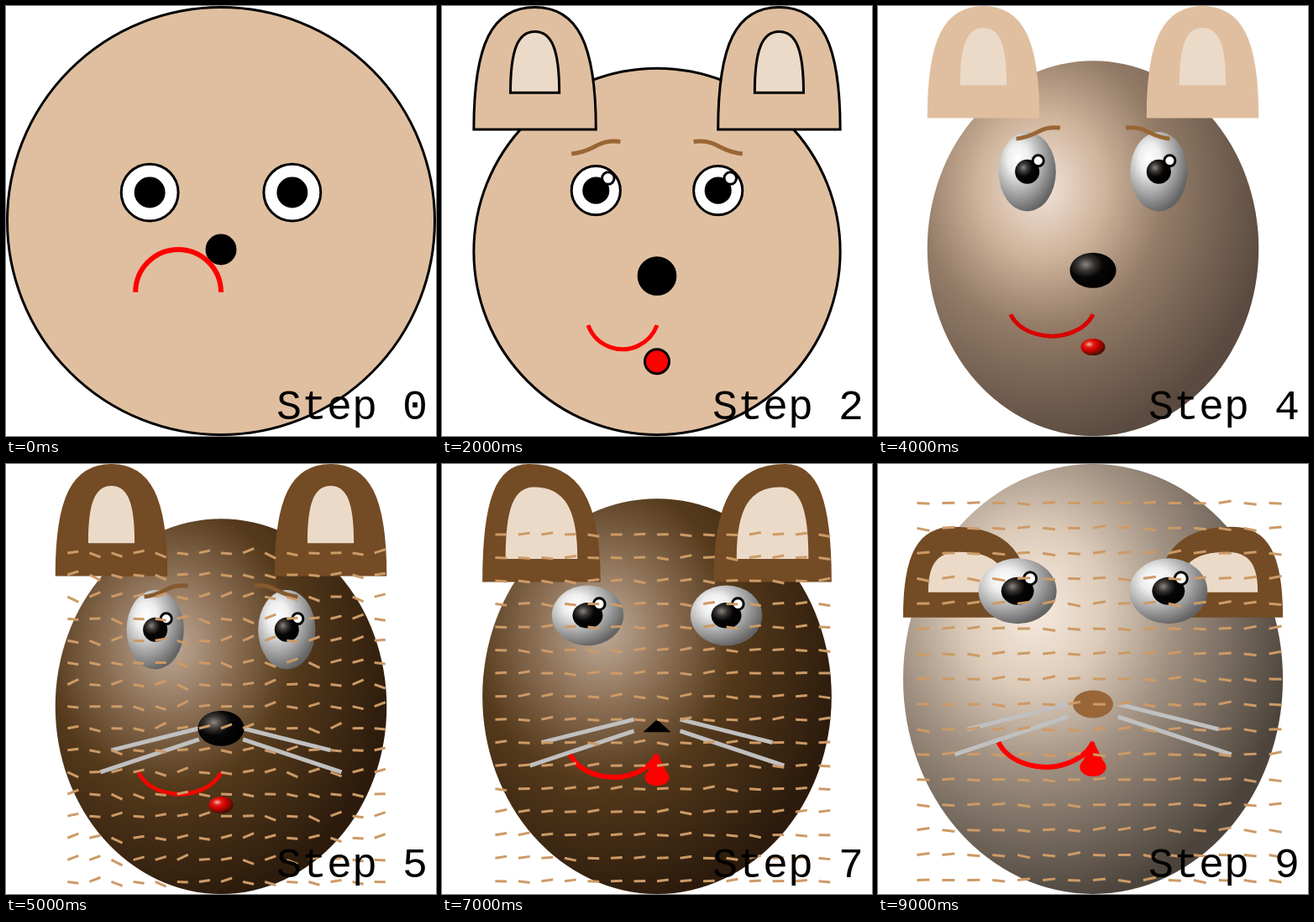
Recreate the animation shown at these times as an HTML page with a canvas. Size 512 by 512 pixels, loop 10 s.

```html
<!DOCTYPE html>
<html>
<head>
<meta charset="utf-8">
<style>
html, body { margin: 0; height: 100%; overflow: hidden; background: #fff; }
canvas { display: block; }
</style>
</head>
<body>
<canvas id="stage" width="512" height="512"></canvas>
<script>
const ctx = document.getElementById('stage').getContext('2d');
const STEP_MS = 1000;
const SKIN = '#e0bfa0', BROWN = '#734b24', INNER_EAR = '#ecdac8', FUR = '#cd9a66';

// Stops of the radial shading, from the lit spot outwards.
const STOPS = [0, 0.25, 0.5, 0.92];
const TAN = ['#f2e4da', '#d0b49c', '#937b67', '#5a4a3f'];
const DARK = ['#c0ab98', '#8c7056', '#553a1c', '#2c1b0c'];
const PALE = ['#f8ece0', '#dccbb9', '#9f8f80', '#4c443c'];
const BALL = ['#ffffff', '#eeeeee', '#b8b8b8', '#646464'];
const PUPIL = ['#8a8580', '#383431', '#060606', '#000000'];
const TONGUE = ['#f5b8a4', '#e01c14', '#cc0000', '#401000'];

// Lengths are in face units; the head is 1.5 units in half-width.
const plain = {
  total: 3.5, headRy: 1.5, skin: SKIN, earFill: SKIN, outline: 'black',
  eye: [0.5, -0.5, 0.2, 0.2], pupil: [0.1, 0.1], nose: [0.15, 0.15],
  mouth: [0.3, 0.3, 0.5], mouthWidth: 5, mouthColor: 'red',
  ear: [-1, 1], earLean: 0, tongue: [0.1, 0.1]
};
const detailed = {
  ...plain, closedEars: true, innerEar: [-1.3, 0.5, 0.2],
  glint: true, brow: -0.8, browColor: '#996633'
};
const oval = {
  ...detailed, total: 3.9, headRy: 1.7, eye: [0.6, -0.7, 0.25, 0.35],
  nose: [0.2, 0.15], mouth: [0.4, 0.3, 0.5], mouthColor: '#e00000',
  ear: [-1.2, 1], innerEar: [-1.5, 0.5, 0.2], brow: -1, tongue: [0.1, 0.065]
};
const shaded = { ...oval, outline: null, skin: TAN, mouthColor: '#d80000' };
const furry = {
  ...shaded, skin: DARK, earFill: BROWN, browColor: '#85592e',
  whiskers: true, fur: 0.05, mouthColor: '#ee0800'
};
const mouse = {
  ...furry, total: 3.7, eye: [0.6, -0.7, 0.3, 0.25], pupil: [0.12, 0.1],
  ear: [-1, 1], innerEar: [-1.2, 0.6, 0.3], earLean: 0.22, brow: null, fur: 0.022,
  mouth: [0.4, 0.3, 0.4], mouthWidth: 6, mouthColor: 'red', tongue: null, drop: true, nose: 'triangle'
};
const lowEars = {
  ...mouse, total: 3.4, skin: PALE, ear: [-0.5, 0.7], innerEar: [-0.7, 0.3, 0.3]
};
const steps = [
  { ...plain, total: 3, eye: [0.5, -0.2, 0.2, 0.2], nose: [0.1, 0.1],
    mouth: [0.3, 0.3, 0.5], frown: true, mouthWidth: 6, ear: null, tongue: null },
  plain,
  detailed,
  oval,
  shaded,
  furry,
  { ...mouse, total: 3.5, ear: [-1, 0.8], innerEar: [-1.2, 0.4, 0.3], nose: [0.2, 0.15] },
  mouse,
  lowEars,
  { ...lowEars, nose: [0.16, 0.11], noseColor: '#99663a' }
];

function randomFrom(seed) {
  return () => {
    seed = (seed * 16807) % 2147483647;
    return seed / 2147483647;
  };
}

function drawFace(face, index) {
  const u = 509 / face.total;
  const cy = 510.5 - face.headRy * u;
  const X = x => 256 + x * u;
  const Y = y => cy + y * u;

  function paint(fill, line) {
    if (fill) { ctx.fillStyle = fill; ctx.fill(); }
    if (line) { ctx.strokeStyle = line; ctx.lineWidth = 3; ctx.stroke(); }
  }

  function ellipse(x, y, rx, ry, fill, line) {
    ctx.beginPath();
    ctx.ellipse(X(x), Y(y), rx * u, ry * u, 0, 0, 7);
    paint(fill, line);
  }

  // A flat outlined ellipse, or a ball lit from the upper left.
  function ball(x, y, rx, ry, flat, colors) {
    if (face.outline) return ellipse(x, y, rx, ry, flat, face.outline);
    ctx.save();
    ctx.translate(X(x), Y(y));
    ctx.scale(rx * u + 1.5, ry * u + 1.5);
    const light = ctx.createRadialGradient(-0.31, -0.33, 0, -0.31, -0.33, 1.5);
    STOPS.forEach((stop, i) => light.addColorStop(stop, colors[i]));
    ctx.beginPath();
    ctx.arc(0, 0, 1, 0, 7);
    ctx.fillStyle = light;
    ctx.fill();
    ctx.restore();
  }

  function line(x1, y1, x2, y2) {
    ctx.moveTo(X(x1), Y(y1));
    ctx.lineTo(X(x2), Y(y2));
  }

  // An arch of two full-shouldered curves; earLean moves its peak outwards.
  function ear(side, base, height, half, fill, closed) {
    const left = side - half, right = side + half;
    const peak = side + side * half * face.earLean;
    const top = Y(base - height), shoulder = Y(base - height * 0.7);
    const towards = edge => X(peak + (edge - peak) * 0.7);
    ctx.beginPath();
    ctx.moveTo(X(left), Y(base));
    ctx.bezierCurveTo(X(left), shoulder, towards(left), top, X(peak), top);
    ctx.bezierCurveTo(towards(right), top, X(right), shoulder, X(right), Y(base));
    if (closed) ctx.closePath();
    paint(fill, face.outline || fill);
  }

  function drawNose() {
    if (face.nose === 'triangle') {
      ctx.beginPath();
      ctx.moveTo(X(0), Y(0.2));
      ctx.lineTo(X(-0.12), Y(0.31));
      ctx.lineTo(X(0.12), Y(0.31));
      ctx.closePath();
      paint('black');
    } else if (face.noseColor) {
      ellipse(0, 0.2, ...face.nose, face.noseColor);
    } else {
      ball(0, 0.2, ...face.nose, 'black', PUPIL);
    }
  }

  function drawMouth() {
    const [rx, ry, y] = face.mouth;
    const start = face.frown ? Math.PI : Math.PI / 9;
    const end = face.frown ? 2 * Math.PI : Math.PI * 8 / 9;
    const x = face.frown ? -rx : -rx * Math.cos(start);
    ctx.beginPath();
    ctx.ellipse(X(x), Y(y), rx * u, ry * u, 0, start, end);
    ctx.strokeStyle = face.mouthColor;
    ctx.lineWidth = face.mouthWidth;
    ctx.stroke();
  }

  function drawTongue() {
    if (face.tongue) ball(0, 0.9, ...face.tongue, face.mouthColor, TONGUE);
    if (!face.drop) return;
    ellipse(0, 0.7, 0.105, 0.075, 'red');
    ctx.beginPath();
    ctx.moveTo(X(0), Y(0.49));
    ctx.lineTo(X(-0.1), Y(0.69));
    ctx.lineTo(X(0.1), Y(0.69));
    paint('red');
  }

  function drawWhiskers() {
    ctx.beginPath();
    for (const side of [-1, 1]) {
      line(side * 0.2, 0.2, side, 0.4);
      line(side * 0.2, 0.3, side * 1.1, 0.6);
    }
    ctx.strokeStyle = '#c0c0c0';
    ctx.lineWidth = 5;
    ctx.stroke();
  }

  function drawFur() {
    const random = randomFrom(7919 * (index + 1));
    ctx.beginPath();
    for (let row = -7; row <= 8; row++) {
      for (let col = -7; col <= 7; col++) {
        const x = col / 5, y = row / 5;
        line(x, y, x + 0.1, y + (random() * 2 - 1) * face.fur);
      }
    }
    ctx.strokeStyle = FUR;
    ctx.lineWidth = 3;
    ctx.stroke();
  }

  function drawBrow(side) {
    const y = face.brow;
    ctx.beginPath();
    ctx.moveTo(X(side * 0.7), Y(y));
    ctx.bezierCurveTo(X(side * 0.5), Y(y - 0.02), X(side * 0.5), Y(y - 0.12), X(side * 0.3), Y(y - 0.1));
    ctx.strokeStyle = face.browColor;
    ctx.lineWidth = 5;
    ctx.stroke();
  }

  ball(0, 0, 1.5, face.headRy, face.skin, face.skin);
  for (const side of [-1, 1]) {
    if (face.ear) ear(side, ...face.ear, 0.5, face.earFill, face.closedEars);
    if (face.innerEar) ear(side, ...face.innerEar, INNER_EAR, true);
  }
  if (face.whiskers) drawWhiskers();
  drawNose();
  drawMouth();
  drawTongue();
  for (const side of [-1, 1]) {
    const [ex, y, rx, ry] = face.eye;
    const x = side * ex;
    ball(x, y, rx, ry, 'white', BALL);
    ball(x, y, ...face.pupil, 'black', PUPIL);
    if (face.glint) ellipse(x + 0.1, y - 0.1, 0.05, 0.05, 'white', 'black');
    if (face.brow) drawBrow(side);
  }
  if (face.fur) drawFur();
}

function frame(now) {
  const index = Math.floor(now / STEP_MS) % steps.length;
  ctx.fillStyle = 'white';
  ctx.fillRect(0, 0, 512, 512);
  drawFace(steps[index], index);
  ctx.fillStyle = 'black';
  ctx.font = '50px "Liberation Mono", monospace';
  ctx.fillText('Step ' + index, 322, 492);
  requestAnimationFrame(frame);
}
requestAnimationFrame(frame);
</script>
</body>
</html>
```
